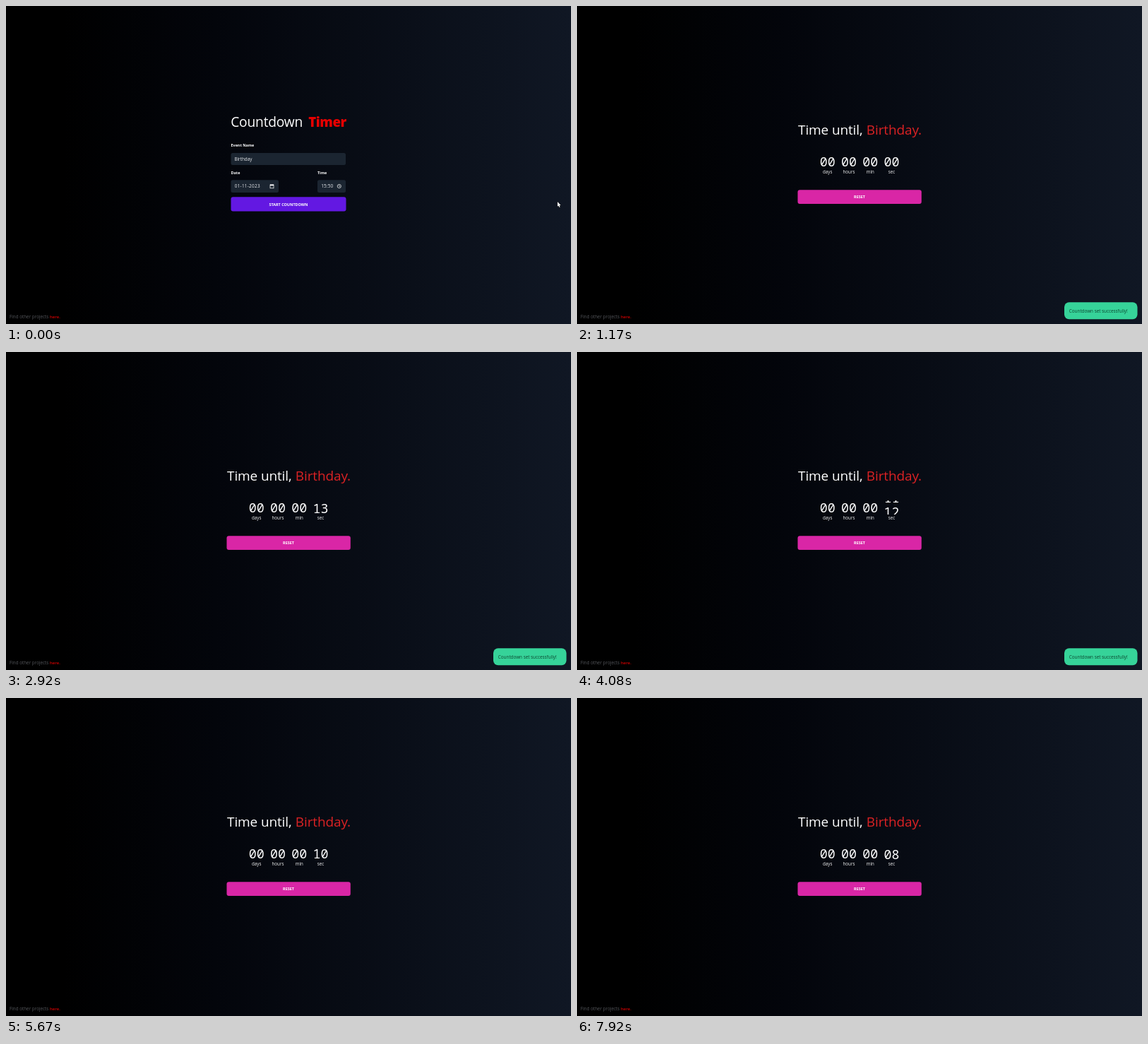
Write an HTML page with a canvas that moves like this. It is 800 px wide and 450 px high and loops after 8000 ms.

```html
<!DOCTYPE html>
<html lang="en">
<head>
<meta charset="utf-8">
<title>Countdown Timer</title>
<style>
html, body { margin: 0; width: 100%; height: 100%; overflow: hidden; background: #000; }
canvas { display: block; width: 800px; height: 450px; }
</style>
</head>
<body>
<canvas id="stage"></canvas>
<script>
const W = 800, H = 450, LOOP = 8000;
const SANS = '"Open Sans", "Noto Sans", sans-serif';
const MONO = '"Noto Sans Mono", monospace';
const canvas = document.getElementById('stage');
const ctx = canvas.getContext('2d');
const dpr = window.devicePixelRatio || 1;
canvas.width = W * dpr;
canvas.height = H * dpr;

const SWITCH = 580, POP = 600, POP_TIME = 250, TOAST_END = 5600;
const CURSOR_STOP = 480, CURSOR_HIDE = 920;
const LINE = 20;
// Seconds shown, and when each one starts rolling in
const values = [0, 13, 12, 11, 10, 9, 8, 7];
const starts = [1605, 2600, 3588, 4600, 5600, 6603, 7605];

const clamp = x => Math.min(1, Math.max(0, x));
const smooth = x => x * x * (3 - 2 * x);
// Closed form of cubic-bezier(1, 0, 0, 1)
const roll = x => smooth(0.5 + Math.cbrt((x - 0.5) / 4));

function text(str, x, y, size, color, opt = {}) {
  ctx.font = `${opt.weight || 400} ${size}px ${opt.font || SANS}`;
  ctx.letterSpacing = (opt.space || 0) + 'px';
  ctx.textAlign = opt.align || 'left';
  ctx.textBaseline = 'alphabetic';
  ctx.fillStyle = color;
  ctx.fillText(str, x, y);
}

function box(x, y, w, h, r, color) {
  ctx.beginPath();
  ctx.roundRect(x, y, w, h, r);
  ctx.fillStyle = color;
  ctx.fill();
}

function background() {
  const g = ctx.createLinearGradient(0, 0, W, 0);
  g.addColorStop(0, '#000000');
  g.addColorStop(0.1, '#000000');
  g.addColorStop(0.37, '#03050b');
  g.addColorStop(0.72, '#0a0f19');
  g.addColorStop(1, '#101724');
  ctx.fillStyle = g;
  ctx.fillRect(0, 0, W, H);
}

function footer() {
  text('Find other projects', 5, 442.3, 6.3, '#54565b');
  text('here.', 62, 442.3, 6, '#d00000', { weight: 600 });
}

function calendarIcon(x, y) {
  ctx.strokeStyle = '#fff';
  ctx.lineWidth = 0.7;
  ctx.strokeRect(x, y, 5, 4.9);
  ctx.fillStyle = '#fff';
  ctx.fillRect(x, y, 5, 1.4);
  ctx.fillRect(x + 0.7, y - 0.8, 0.7, 1);
  ctx.fillRect(x + 3.6, y - 0.8, 0.7, 1);
}

function clockIcon(x, y) {
  ctx.strokeStyle = '#fff';
  ctx.lineWidth = 0.7;
  ctx.beginPath();
  ctx.arc(x, y, 2.6, 0, Math.PI * 2);
  ctx.moveTo(x, y - 1.6);
  ctx.lineTo(x, y + 0.2);
  ctx.lineTo(x + 1.3, y + 0.9);
  ctx.stroke();
}

function form() {
  const field = '#1b2531', label = { weight: 700 };
  text('Countdown', 318.2, 171, 19.2, '#fff', { space: -0.2 });
  text('Timer', 481.6, 171, 18.6, '#e50000', { weight: 800, align: 'right', space: -0.5 });

  text('Event Name', 318.6, 199.2, 5.4, '#fff', label);
  box(318.5, 208, 162.5, 17, 2.5, field);
  text('Birthday', 323.4, 218.8, 6.35, '#e8eaed');

  text('Date', 318.6, 237.6, 5.4, '#fff', label);
  box(318.5, 246.3, 67.5, 17.7, 2.5, field);
  text('01-11-2023', 323.7, 257.4, 6.4, '#e8eaed', { space: 0.28 });
  calendarIcon(374, 252.9);

  text('Time', 441, 237.6, 5.4, '#fff', label);
  box(441, 246.3, 40, 17.7, 2.5, field);
  text('15:50', 446.2, 257.4, 6.5, '#e8eaed', { space: 0.1 });
  clockIcon(471.8, 255);

  box(318.5, 270.3, 163, 20.2, 3, '#6318e2');
  text('START COUNTDOWN', 400, 282.5, 5.45, '#fff', { weight: 700, align: 'center' });
}

function seconds(t) {
  let v = values[0];
  starts.forEach((s, i) => {
    if (t >= s) v = values[i] + (values[i + 1] - values[i]) * roll(clamp((t - s) / 1000));
  });
  return v;
}

function counter(cx, v, name) {
  ctx.save();
  ctx.beginPath();
  ctx.rect(cx - 12, 210, 24, LINE);
  ctx.clip();
  for (let k = Math.floor(v); k <= Math.ceil(v); k++) {
    text(String(k).padStart(2, '0'), cx, 227 + (k - v) * LINE, 18.35, '#fff',
      { font: MONO, align: 'center' });
  }
  ctx.restore();
  text(name, cx, 237.4, 6.2, '#f4f4f4', { align: 'center' });
}

function countdown(t) {
  text('Time until,', 313, 181.7, 19, '#fff', { space: -0.13 });
  text('Birthday.', 488, 181.7, 19, '#dc2224', { align: 'right', space: -0.13 });
  ['days', 'hours', 'min', 'sec'].forEach((name, i) =>
    counter(354.7 + i * 30.25, i === 3 ? seconds(t) : 0, name));
  box(312.5, 260.2, 175.3, 19.8, 3, '#d926a6');
  text('RESET', 400, 272.2, 5.45, '#fff', { weight: 700, align: 'center' });
}

function toast(t) {
  if (t < POP || t >= TOAST_END) return;
  const p = 1 - Math.pow(1 - clamp((t - POP) / POP_TIME), 1.6);
  const scale = 0.9 + 0.1 * p;
  ctx.save();
  ctx.globalAlpha = p;
  ctx.translate(741.8, 431.3);
  ctx.scale(scale, scale);
  ctx.translate(-741.8, -431.3);
  box(690, 419.3, 103.5, 24, 6.7, '#36d399');
  text('Countdown set successfully!', 696.8, 434, 6.33, '#0c4630');
  ctx.restore();
}

function cursor(t) {
  if (t >= CURSOR_HIDE) return;
  const p = smooth(clamp(t / CURSOR_STOP));
  ctx.save();
  ctx.translate(780.9 - 331 * p, 277 + 7 * p);
  ctx.beginPath();
  [[0, 0], [0, 6.8], [1.5, 5.5], [2.6, 8.1], [3.7, 7.6], [2.7, 5.2], [4.7, 5]]
    .forEach(([x, y]) => ctx.lineTo(x, y));
  ctx.closePath();
  ctx.strokeStyle = '#000';
  ctx.lineWidth = 0.8;
  ctx.stroke();
  ctx.fillStyle = '#fff';
  ctx.fill();
  ctx.restore();
}

function draw(t) {
  ctx.setTransform(dpr, 0, 0, dpr, 0, 0);
  background();
  footer();
  if (t < SWITCH) form();
  else countdown(t);
  toast(t);
  cursor(t);
}

const begin = performance.now();
function frame() {
  draw((performance.now() - begin) % LOOP);
  requestAnimationFrame(frame);
}
frame();
</script>
</body>
</html>
```
